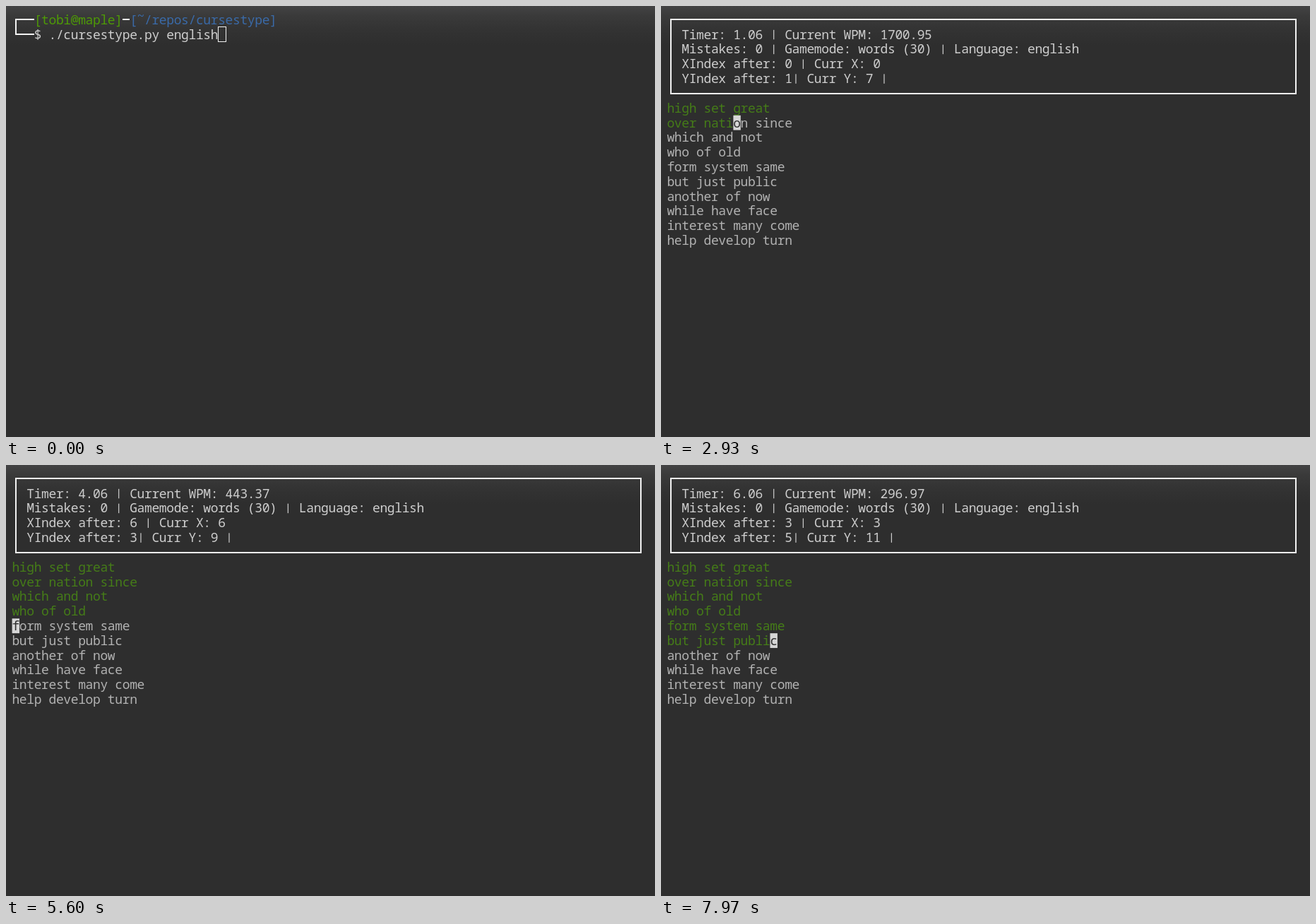
An HTML page with a canvas that plays this animation: 919x610 px, repeating every 8 s.

```html
<!DOCTYPE html>
<html lang="en">
<head>
<meta charset="utf-8">
<title>Terminal typing test</title>
<style>
  html, body { margin: 0; width: 100%; height: 100%; overflow: hidden; background: #2e2e2e; }
  canvas { display: block; width: 919px; height: 610px; }
</style>
</head>
<body>
<canvas id="stage" width="919" height="610"></canvas>
<script>
const ctx = document.getElementById('stage').getContext('2d');
const LOOP = 8000, START = 30;
const CELL_W = 10.42, CELL_H = 20.83, LEFT = 8.6, TOP = 9;
const FONT = '100 18px "Noto Sans Mono", "DejaVu Sans Mono", monospace';
const WHITE = '#f2f2f2', BRIGHT = '#cecece', PLAIN = '#b2b2b2';
const GREEN = '#4e9a06', TYPED = '#457c18', BLUE = '#3a6aa8';
const DARK = '#2e2e2e', BLOCK = '#d6d6d6';

const lines = [
  'high set great', 'over nation since', 'which and not', 'who of old',
  'form system same', 'but just public', 'another of now', 'while have face',
  'interest many come', 'help develop turn'
];

// [keys typed, time in ms]; typing is even between neighbours
const pace = [
  [1, 1150], [3, 1350], [14, 2020], [15, 2190], [16, 2330], [33, 3595],
  [34, 3700], [37, 3930], [38, 4100], [40, 4210], [46, 4560], [58, 5560],
  [59, 5670], [65, 6200], [70, 6560], [75, 6890], [78, 7205], [81, 7330],
  [82, 7430], [88, 7830], [89, 7970]
];

// The status refreshes once a second: [keys typed, speed shown]
const ticks = [
  [1, '31295.98'], [15, '1700.95'], [28, '874.37'], [40, '588.36'],
  [53, '443.37'], [65, '355.72'], [78, '296.97']
];

const colX = col => LEFT + col * CELL_W;
const rowY = row => TOP + row * CELL_H;

function keysAt(t) {
  if (t < pace[0][1]) return 0;
  for (let i = 1; i < pace.length; i++) {
    const [n0, t0] = pace[i - 1], [n1, t1] = pace[i];
    if (t < t1) return Math.floor(n0 + (n1 - n0) * (t - t0) / (t1 - t0) + 1e-6);
  }
  return pace[pace.length - 1][0];
}

// Each finished line takes one more key to move on
function position(keys) {
  let row = 0;
  while (keys > lines[row].length) keys -= lines[row++].length + 1;
  return { row, col: keys };
}

function write(text, col, row, color) {
  ctx.fillStyle = color;
  [...text].forEach((ch, i) => {
    const x = colX(col + i + 0.5), y = rowY(row);
    if (ch === '|') ctx.fillRect(x - 0.6, y + 4, 1.2, 13.5);
    else if (ch !== ' ') ctx.fillText(ch, x, y + (ch === '~' ? 10.5 : 16.7));
  });
}

function drawBackground() {
  const shade = ctx.createLinearGradient(0, 0, 0, 55);
  shade.addColorStop(0, '#434344');
  shade.addColorStop(0.25, '#3a3a3a');
  shade.addColorStop(0.6, '#333333');
  shade.addColorStop(1, DARK);
  ctx.fillStyle = shade;
  ctx.fillRect(0, 0, 919, 610);
}

function drawPrompt() {
  ctx.fillStyle = WHITE;
  ctx.fillRect(13, 18, 2, 23);
  ctx.fillRect(13, 18, 27, 2);
  ctx.fillRect(13, 39, 27, 2);
  ctx.fillRect(165, 18, 10, 2);
  write('[tobi@maple]', 3, 0, GREEN);
  write('[~/repos/cursestype]', 16, 0, BLUE);
  write('$ ./cursestype.py english', 3, 1, BRIGHT);
  ctx.strokeStyle = WHITE;
  ctx.lineWidth = 1;
  ctx.strokeRect(300.5, 29.5, 11, 21);
}

function drawStatus(keys) {
  ctx.strokeStyle = WHITE;
  ctx.lineWidth = 2;
  ctx.strokeRect(14, 19, 885, 105);
  const tick = ticks.filter(([n]) => n <= keys).length - 1;
  const [n, speed] = tick < 0 ? [0, '0.00'] : ticks[tick];
  const time = tick < 0 ? '0.00' : tick + '.06';
  const { row, col } = position(n);
  [
    `Timer: ${time} | Current WPM: ${speed}`,
    'Mistakes: 0 | Gamemode: words (30) | Language: english',
    `XIndex after: ${col} | Curr X: ${col}`,
    `YIndex after: ${row}| Curr Y: ${row + 6} |`
  ].forEach((text, i) => write(text, 2, i + 1, BRIGHT));
}

function drawWords(keys) {
  const at = position(keys);
  lines.forEach((text, i) => {
    const done = i < at.row ? text.length : i === at.row ? at.col : 0;
    write(text.slice(0, done), 0, i + 6, TYPED);
    write(text.slice(done), done, i + 6, PLAIN);
  });
  ctx.fillStyle = BLOCK;
  ctx.fillRect(colX(at.col), rowY(at.row + 6), CELL_W, CELL_H);
  write(lines[at.row].charAt(at.col), at.col, at.row + 6, DARK);
}

function draw(now) {
  const t = now % LOOP;
  ctx.font = FONT;
  ctx.textAlign = 'center';
  drawBackground();
  if (t < START) {
    drawPrompt();
  } else {
    const keys = keysAt(t);
    drawStatus(keys);
    drawWords(keys);
  }
}

const begin = performance.now();
function frame() {
  draw(performance.now() - begin);
  requestAnimationFrame(frame);
}
frame();
</script>
</body>
</html>
```
